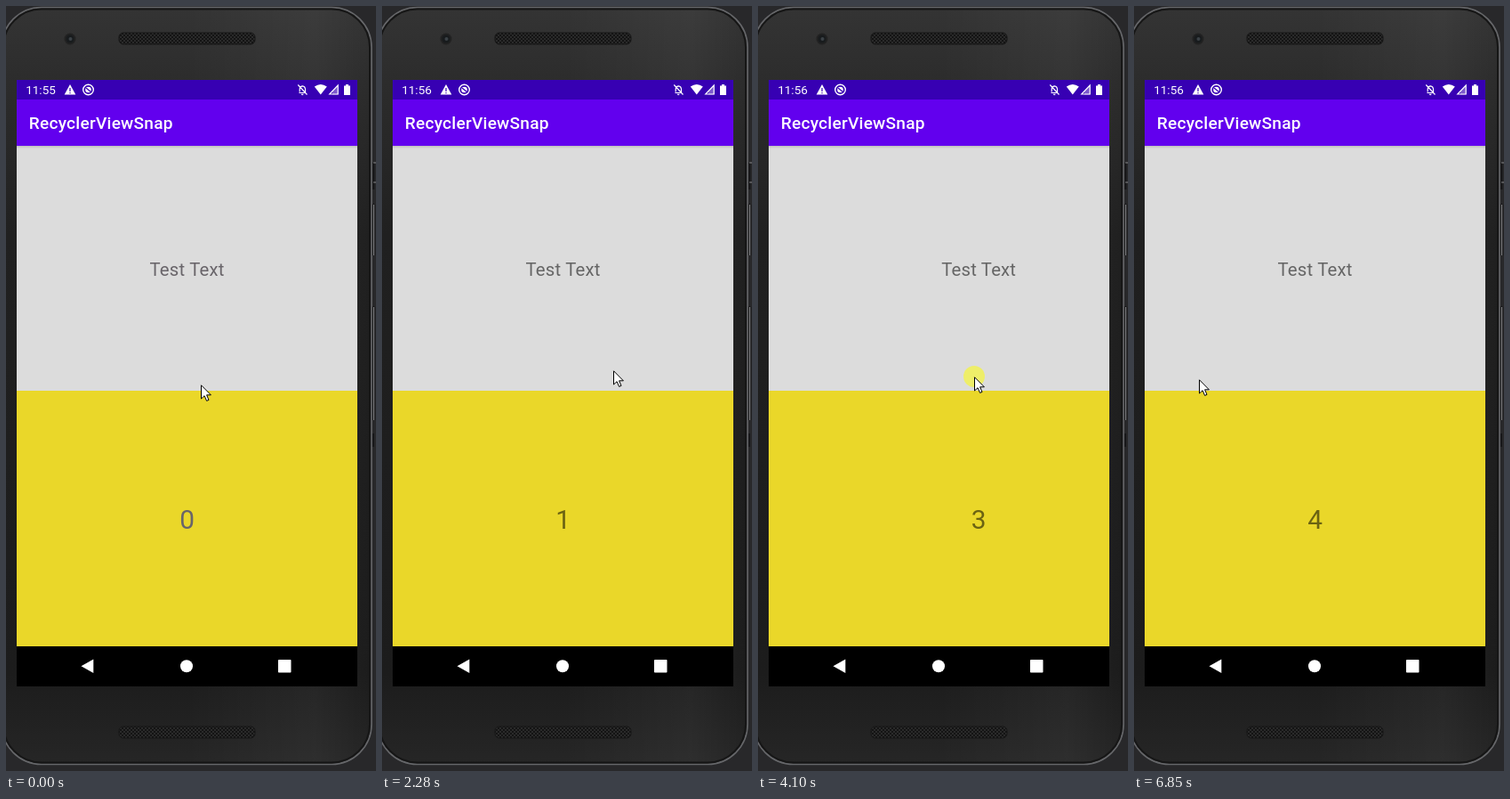
These frames come from a looping animation (416 by 859 pixels, 7.4 s). An HTML page:

```html
<!DOCTYPE html>
<html lang="en">
<head>
<meta charset="utf-8">
<title>RecyclerViewSnap</title>
<style>
  html, body { margin: 0; width: 100%; height: 100%; overflow: hidden; background: #28282a; }
  svg { display: block; width: 100%; height: 100%; font-family: Roboto, sans-serif; }
  .page { fill: #000; fill-opacity: .54; text-anchor: middle; }
  .page:first-child { fill: #69656a; fill-opacity: 1; }
  .label { font-size: 20.3px; letter-spacing: .01em; }
  .digit { font-size: 29.8px; }
</style>
</head>
<body>
<svg viewBox="0 0 416 859">
  <defs>
    <linearGradient id="body" x2="0" y2="1">
      <stop offset="0" stop-color="#343434"/>
      <stop offset=".1" stop-color="#2c2c2c"/>
      <stop offset=".3" stop-color="#202020"/>
      <stop offset=".88" stop-color="#1c1c1c"/>
      <stop offset="1" stop-color="#262626"/>
    </linearGradient>
    <linearGradient id="sheen">
      <stop offset=".5" stop-color="#fff" stop-opacity="0"/>
      <stop offset=".85" stop-color="#fff" stop-opacity=".04"/>
      <stop offset="1" stop-color="#fff" stop-opacity="0"/>
    </linearGradient>
    <linearGradient id="shade" x2="0" y2="1">
      <stop offset="0" stop-color="#000" stop-opacity=".14"/>
      <stop offset="1" stop-color="#000" stop-opacity="0"/>
    </linearGradient>
    <pattern id="mesh" width="4" height="4" patternUnits="userSpaceOnUse">
      <rect width="4" height="4" fill="#2a2a2a"/>
      <circle cx="1" cy="1" r="1" fill="#0c0c0c"/>
      <circle cx="3" cy="3" r="1" fill="#0c0c0c"/>
    </pattern>
    <clipPath id="screen"><rect x="12" y="157" width="383" height="562"/></clipPath>
  </defs>

  <!-- phone -->
  <path d="M413 176V206M413 222V280M413 337V465M412.5 480V495" stroke="#18181a" stroke-width="3"/>
  <path d="M413 176H416M413 198H416M413.5 223V280M413.5 338V465" stroke="#858588" fill="none"/>
  <rect x="-5" y="1.5" width="416" height="850" rx="45" fill="url(#body)" stroke="#66676a" stroke-width="1.6"/>
  <rect x="-3" y="3.5" width="412" height="846" rx="43" fill="url(#sheen)" stroke="#161616" stroke-width="2"/>
  <circle cx="72" cy="37" r="6.5" fill="#222"/>
  <circle cx="72" cy="37" r="4.5" fill="#181b1d"/>
  <circle cx="72.5" cy="37" r="2" fill="#3b4146"/>
  <rect x="127" y="30" width="153" height="13" rx="5" fill="url(#mesh)" stroke="#171717"/>
  <rect x="127" y="809" width="153" height="13" rx="5" fill="url(#mesh)" stroke="#171717"/>

  <!-- screen -->
  <rect x="12" y="83" width="383" height="22" fill="#3700b3"/>
  <rect x="12" y="105" width="383" height="52" fill="#6200ee"/>
  <rect x="12" y="157" width="383" height="275" fill="#dcdcdc"/>
  <rect x="12" y="157" width="383" height="3" fill="url(#shade)"/>
  <rect x="12" y="432" width="383" height="287" fill="#ead729"/>
  <rect x="12" y="719" width="383" height="45" fill="#000"/>
  <g fill="#fff">
    <text id="clock" x="22.2" y="99" font-size="13.5"></text>
    <text x="25.8" y="138" font-size="19.1" font-weight="500" letter-spacing=".0125em">RecyclerViewSnap</text>
    <path d="M72 88L78.3 99.5H65.7Z"/>
    <path d="M72 92V96M72 97V98.2" stroke="#3700b3" stroke-width="1.2"/>
    <circle cx="92.5" cy="94" r="5.8" fill="none" stroke="#fff" stroke-width="1.4"/>
    <circle cx="92.5" cy="94" r="3.3"/>
    <path d="M90 92L95.5 96.5" stroke="#3700b3" stroke-width="1.3"/>
    <path d="M329.5 97.5H336.5V93.5Q336.5 90.3 333.2 89.8Q330.3 90.3 330.2 93.5V96.5M328.3 88.5L338.5 99.5" fill="none" stroke="#fff" stroke-width="1.2"/>
    <path d="M331.8 98.8H334.6A1.4 1.4 0 0 1 331.8 98.8Z"/>
    <path d="M346.8 90.6Q353.8 85.6 360.8 90.6L353.8 99.6Z"/>
    <path d="M373.2 89V99H363.8Z" fill="none" stroke="#fff" stroke-width="1.2"/>
    <path d="M367 96L373.5 89V99.5H367Z" fill-opacity=".35"/>
    <path d="M380 89.5H382V88H385V89.5H387V100H380Z"/>
    <path d="M84.5 741.3L98.3 733.5V749Z"/>
    <circle cx="203" cy="741.3" r="7"/>
    <rect x="306" y="734" width="14.5" height="14.5" rx=".8"/>
  </g>
  <g clip-path="url(#screen)" id="pages"></g>

  <g id="cursor">
    <circle id="touch" r="12" fill="#ff0" fill-opacity=".52"/>
    <path d="M.5 .8V16L4.1 12.7L6.6 18.4L9 17.4L6.6 11.8H11.4Z" fill="#fff" stroke="#000" stroke-linejoin="round"/>
  </g>
</svg>
<script>
const LOOP = 7400, PAGE = 383, CENTER = 203.5;
const GLIDE = 365;     // time the pointer takes to reach its next press
const BRAKE = 0.0035;  // deceleration of a released page, px per ms squared
const MINUTE = 2070;
const $ = id => document.getElementById(id);

// One drag of the pointer from x0 to x1; equal ends mean it only rests there.
const drag = (press, release, y, x0, x1 = x0) => ({ press, release, y, x0, x1 });
const drags = [
  drag(0, 180, 425, 219),
  drag(1250, 1560, 422, 244, 150),
  drag(2390, 2573, 409, 260, 154),
  drag(3440, 3600, 414, 234, 150),
  drag(4000, 4165, 416, 198, 271),
  drag(4530, 4705, 422, 276, 206),
  drag(5940, 6326, 431, 287, 151),
  drag(LOOP, LOOP, 419, 73)
];

// Every drag turns one page, against the direction of the pointer.
let turned = 0;
for (const d of drags) {
  d.from = turned;
  d.to = turned += Math.sign(d.x0 - d.x1);
}

const mix = (a, b, k) => a + (b - a) * k;
const clamp = k => Math.min(1, Math.max(0, k));
const smooth = k => k * k * (3 - 2 * k);

function pointer(t, d, next) {
  if (t < d.release) return [mix(d.x0, d.x1, (t - d.press) / (d.release - d.press)), d.y];
  const k = smooth(clamp((t - d.release) / GLIDE));
  return [mix(d.x1, next.x0, k), mix(d.y, next.y, k)];
}

function scroll(t, d, x) {
  if (t < d.release) return d.from * PAGE + d.x0 - x;
  // Decelerate evenly until the page snaps into place.
  const rest = d.to * PAGE - (d.from * PAGE + d.x0 - d.x1);
  const left = Math.max(0, Math.sqrt(Math.abs(rest) / BRAKE) - (t - d.release));
  return d.to * PAGE - Math.sign(rest) * BRAKE * left * left;
}

$("pages").innerHTML = Array.from({ length: turned + 1 }, (_, n) => `<g class="page">
  <text class="label" y="302.8">Test Text</text><text class="digit" y="587.3">${n}</text></g>`).join("");
const pages = [...$("pages").children];

function draw(t) {
  const i = drags.findIndex(d => d.press > t) - 1;
  const d = drags[i];
  const [x, y] = pointer(t, d, drags[i + 1]);
  const offset = scroll(t, d, x);
  const held = t < d.release && d.x0 !== d.x1;
  pages.forEach((page, n) =>
    page.setAttribute("transform", `translate(${CENTER + n * PAGE - offset} 0)`));
  $("cursor").setAttribute("transform", `translate(${Math.round(x)} ${Math.round(y)})`);
  $("touch").setAttribute("visibility", held ? "visible" : "hidden");
  $("clock").textContent = t < MINUTE ? "11:55" : "11:56";
}

const began = performance.now();
function tick() {
  draw(Math.max(0, performance.now() - began) % LOOP);
  requestAnimationFrame(tick);
}
tick();
</script>
</body>
</html>
```
